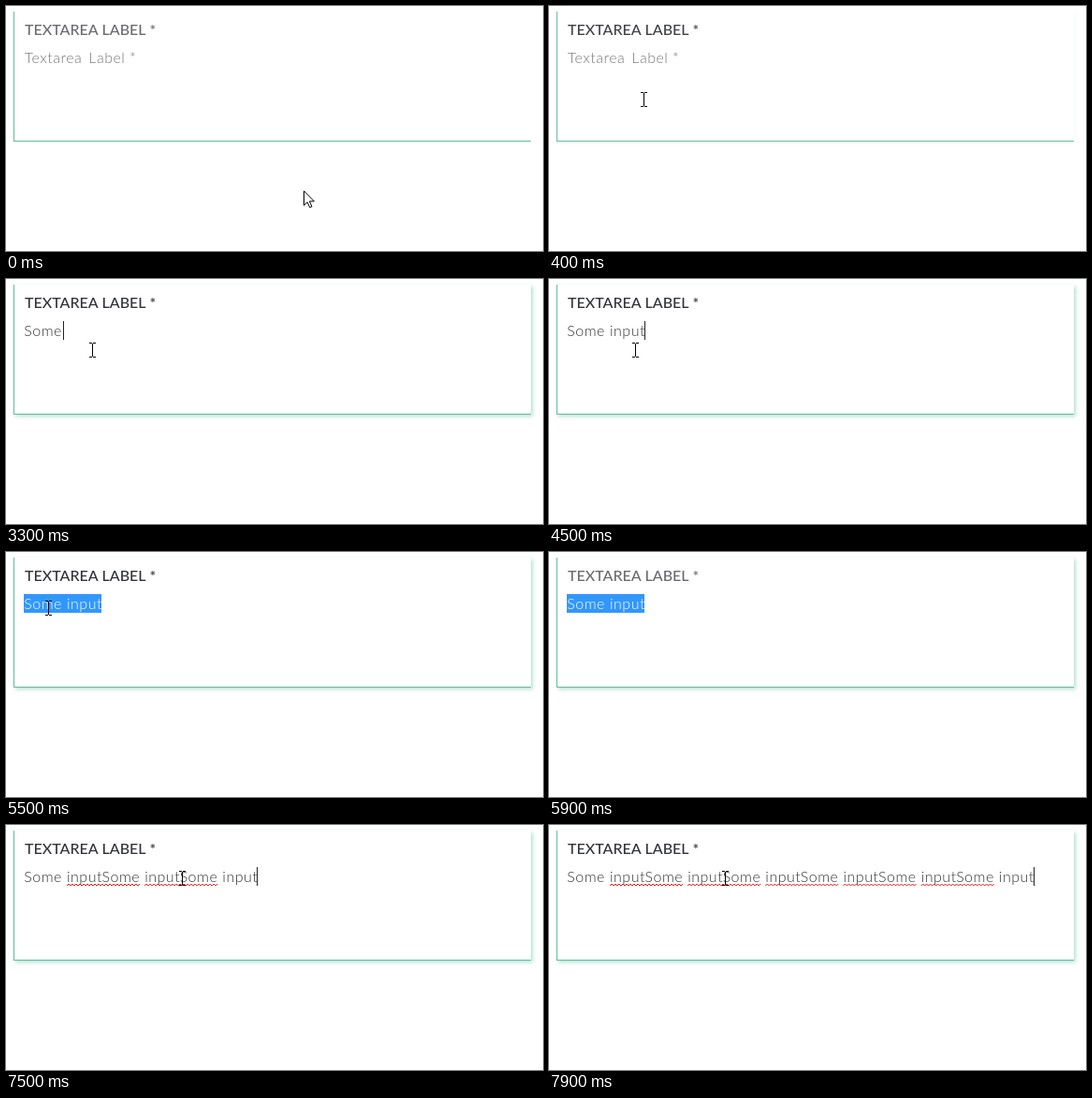
Animation, 574 px wide and 262 px high, one loop 8 s. Source, as an HTML page:

```html
<!DOCTYPE html>
<html lang="en">
<head>
<meta charset="utf-8">
<title>Textarea focus and typing</title>
<style>
  html, body { margin: 0; width: 100%; height: 100%; overflow: hidden; background: #fff; }
  #field {
    position: absolute; left: 8px; top: 6px; width: 553px; height: 139px;
    box-sizing: border-box; background: #fff;
    border: solid #5fbd9f; border-width: 0 0 1px 1px;
  }
  svg { position: absolute; left: 0; top: 0; }
  text { font: 300 16px Lato, "Open Sans", sans-serif; letter-spacing: .5px; }
  #label text { font-weight: 500; letter-spacing: 0; fill: #303236; }
  #placeholder { fill: #777; }
  #squiggles { fill: none; stroke: #e01818; stroke-width: 1; }
  #caret, #selection, #beam { shape-rendering: crispEdges; }
</style>
</head>
<body>
<div id="field"></div>
<svg width="574" height="262" viewBox="0 0 574 262">
  <g id="label">
    <text x="20" y="31">TEXTAREA</text><text x="102.5" y="31">LABEL</text><text x="153.5" y="31">*</text>
  </g>
  <g id="placeholder">
    <text x="19.7" y="61">Textarea</text><text x="88.3" y="61">Label</text><text x="132" y="61">*</text>
  </g>
  <rect id="selection" x="19" y="45" width="83" height="20" fill="#3297fd"/>
  <g id="typed"></g>
  <path id="squiggles"/>
  <rect id="caret" y="45" width="1" height="20" fill="#222"/>
  <path id="arrow" d="M.5.8v15.4l3.6-3.4 2.6 5.7 2.3-1-2.6-5.6h5z" fill="#fff" stroke="#000"/>
  <path id="beam" d="M-3-7.5h3m1 0h3M.5-7v14M-3 7.5h3m1 0h3" fill="none" stroke="#000"/>
</svg>
<script>
const $ = id => document.getElementById(id);
const LOOP = 8000, TICK = 100;
const PHRASE = "Some input", LEFT = 19, PERIOD = 83.17, WORD_2 = 46;

// Caret offset after each typed letter of the phrase
const CARET = [0, 9, 19, 33, 42, 46, 50, 59, 69, 78, 83.17];
const KEYS = [2700, 3000, 3200, 3300, 3500, 3700, 3900, 4200, 4300, 4500];
const PASTES = [7300, 7500, 7600, 7700, 7900];
const BLINKS = [1000, 1600, 2100, 2600];

const LABEL = [[100, .72], [500, 1], [5800, 1], [5900, .72], [6100, 1]];
const SHADOW = [[300, 0], [400, .12], [800, 1]];
const POINTER_X = [[0, 318], [100, 282], [200, 195], [300, 128], [400, 101], [800, 92],
  [5100, 92], [5200, 106], [5300, 120], [5400, 120], [5500, 45], [6600, 101], [6800, 188]];
const POINTER_Y = [[0, 197], [100, 181], [200, 137], [300, 112], [400, 100], [800, 76],
  [5100, 76], [5200, 70], [5300, 65], [5500, 60], [6600, 57]];

const passed = (times, t) => times.filter(time => time <= t).length;
const show = (id, on) => $(id).setAttribute("visibility", on ? "visible" : "hidden");

function track(keys, t) {
  const next = keys.findIndex(key => key[0] > t);
  if (next === 0) return keys[0][1];
  if (next < 0) return keys[keys.length - 1][1];
  const [t0, a] = keys[next - 1], [t1, b] = keys[next];
  return a + (b - a) * (t - t0) / (t1 - t0);
}

function phrase(x, length, color) {
  const word = (from, to, dx) =>
    `<text x="${x + dx}" y="61" fill="${color}">${PHRASE.slice(from, Math.min(to, length))}</text>`;
  return word(0, 4, .3) + (length > 5 ? word(5, 10, WORD_2) : "");
}

function squiggle(x) {
  return `M${x} 65` + "l2-2l2 2".repeat(19) + "l2-2";
}

function caretVisible(t, selected) {
  if (t < KEYS[0]) return passed(BLINKS, t) % 2 === 1;
  return !selected && !(t >= 5000 && t < 5500);
}

function draw(t) {
  const letters = passed(KEYS, t), extra = passed(PASTES, t);
  const selected = t >= 5500 && t < 7000;

  $("label").setAttribute("opacity", track(LABEL, t));
  $("field").style.boxShadow = `2px 2px 4px rgba(95,189,159,${.45 * track(SHADOW, t)})`;

  show("placeholder", letters === 0);
  show("selection", selected);
  let text = phrase(LEFT, letters, selected ? "#fff" : "#333"), waves = "";
  for (let i = 1; i <= extra; i++) {
    text += phrase(LEFT + i * PERIOD, PHRASE.length, "#333");
    waves += squiggle(LEFT + WORD_2 + (i - 1) * PERIOD);
  }
  $("typed").innerHTML = text;
  $("squiggles").setAttribute("d", waves);

  $("caret").setAttribute("x", Math.floor(LEFT + CARET[letters] + extra * PERIOD));
  show("caret", caretVisible(t, selected));

  const x = Math.round(track(POINTER_X, t)), y = Math.round(track(POINTER_Y, t));
  for (const id of ["arrow", "beam"]) $(id).setAttribute("transform", `translate(${x} ${y})`);
  show("arrow", t < 200);
  show("beam", t >= 200 && !(t >= 5600 && t < 6600));
}

function loop() {
  const t = performance.now() % LOOP;
  draw(Math.floor(t / TICK) * TICK);
  requestAnimationFrame(loop);
}
loop();
</script>
</body>
</html>
```
